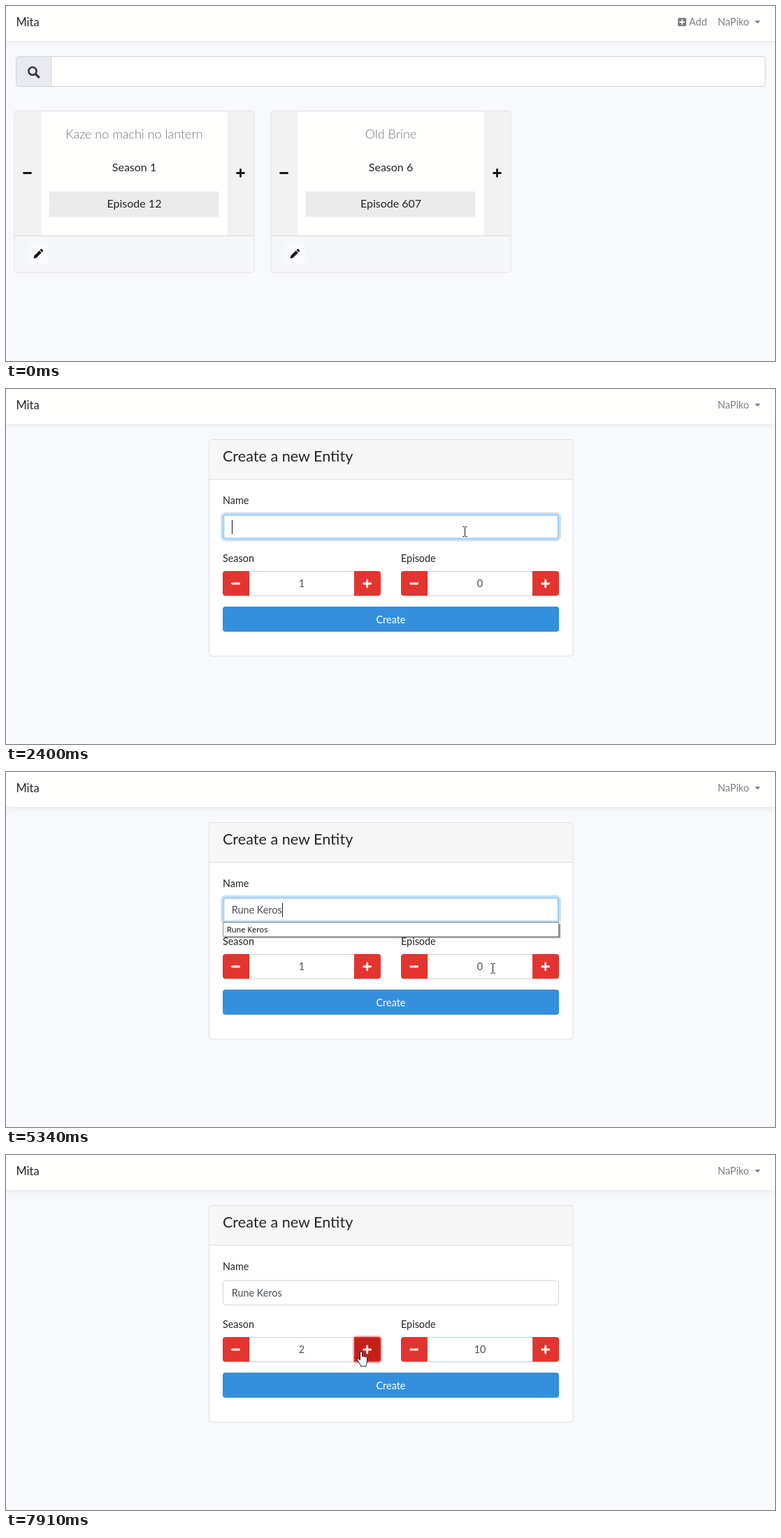
An HTML page that plays this animation: 1100 px wide and 509 px high, repeating every 7990 ms.

```html
<!DOCTYPE html>
<html lang="en">
<head>
<meta charset="utf-8">
<title>Mita</title>
<style>
  html, body { margin: 0; width: 100%; height: 100%; overflow: hidden; background: #f8f9fd; }
  svg { display: block; }
  text { font-family: Lato, "Open Sans", sans-serif; white-space: pre; }
  .nav { fill: #fffffe; filter: drop-shadow(0 2px 4px rgba(0, 0, 0, .075)); }
</style>
</head>
<body>
<svg id="stage" width="1100" height="509" viewBox="0 0 1100 509"></svg>
<script>
const LOOP = 7990;
const INK = '#212529', GREY = '#495057', LINE = '#ced4da', RED = '#e3342f';
const USER = 'NaPiko', SHOW = 'Rune Keros';

// Markup helpers
const text = (x, y, s, size = 14.4, fill = INK, more = '') =>
  `<text x="${x}" y="${y}" font-size="${size}" fill="${fill}" ${more}>${s}</text>`;
const mid = (x, y, s, size, fill, more = '') =>
  text(x, y, s, size, fill, 'text-anchor="middle" ' + more);
const rect = (x, y, w, h, fill, more = '') =>
  `<rect x="${x}" y="${y}" width="${w}" height="${h}" fill="${fill}" ${more}/>`;
const path = (d, more) => `<path d="${d}" ${more}/>`;
const sign = (x, y, plus, color) =>
  path(`M${x - 5} ${y}h10` + (plus ? `M${x} ${y - 5}v10` : ''),
    `stroke="${color}" stroke-width="2.8" stroke-linecap="round"`);
const group = (id, body) => `<g id="${id}">${body}</g>`;

function card(x, name, season, episode) {
  const c = x + 172;
  return rect(x + .5, 150.5, 343, 231.5, '#fffffe', 'rx="3.5"') +
    rect(x + 1, 151, 38, 179, '#f2f2f2') + rect(x + 305, 151, 38, 179, '#f2f2f2') +
    rect(x + 1, 330, 342, 51, '#f6f7f9') +
    path(`M${x} 329.5h343`, 'stroke="#d8d9dc"') +
    rect(x + .5, 150.5, 343, 231.5, 'none', 'rx="3.5" stroke="#dedfe1"') +
    sign(x + 19, 239.5, false, '#17141d') + sign(x + 324, 239.5, true, '#17141d') +
    mid(c, 190, name, 18, '#6c757d', 'font-weight="300"') +
    mid(c, 237, season, 16) +
    rect(x + 50, 266, 243, 36.5, '#ebebeb') +
    mid(c, 289, episode, 16) +
    rect(x + 20, 341, 30, 29, '#f8fafc', 'rx="3"') +
    path(`M${x + 28} 362l.8-3.9 7.4-7.4 3.1 3.1-7.4 7.4z
      M${x + 37} 349.9l1.2-1.2q.9-.8 1.8 0l1.3 1.3q.9.9 0 1.8l-1.2 1.2z`, 'fill="#1b1722"');
}

// Rounded on the left (-1) or right (1) side only
function button(id, x, side) {
  const d = side < 0
    ? `M${x + 38} 261h-34q-4 0-4 4v27.5q0 4 4 4h34z`
    : `M${x} 261h34q4 0 4 4v27.5q0 4-4 4h-34z`;
  return path(d, `id="${id}" fill="${RED}"`) + sign(x + 18.7, 279, side > 0, '#fff');
}
const stepper = (x, id) =>
  rect(x + 37.5, 261.5, 151, 35, '#fff', `stroke="${LINE}"`) +
  button(id + 'Minus', x, -1) + button(id + 'Plus', x + 188, 1);
const ring = (id, x, y, w, h, rgb, r = 0) =>
  rect(x, y, w, h, 'none', `id="${id}Ring" rx="${r}" stroke="${rgb}"`);
const caret = (id, y) => rect(0, y, 1, 20, '#111', `id="${id}Caret"`);

const stage = document.getElementById('stage');
stage.innerHTML =
  rect(0, 0, 1100, 50, '#fffffe', 'class="nav"') +
  text(14.5, 29, 'Mita', 16.4) +
  text(1018, 28, USER, 14.4, '#808080') +
  path('M1071 21h8l-4 4.2z', 'fill="#808080"') +

  group('home',
    group('add',
      rect(961, 17, 12, 12, 'currentColor', 'rx="1.6"') +
      path('M963.3 23h7.4M967 19.3v7.4', 'stroke="#fff" stroke-width="1.8"') +
      text(977, 28, 'Add', 14.4, 'currentColor')) +
    rect(14.5, 72.5, 1071.5, 43, '#fff', 'rx="4"') +
    path('M64.5 73v42H18.5q-3.5 0-3.5-3.5V76.5q0-3.5 3.5-3.5z', 'fill="#e9eaf0"') +
    path('M64.5 73v42', `stroke="${LINE}"`) +
    rect(14.5, 72.5, 1071.5, 43, 'none', `rx="4" stroke="${LINE}"`) +
    '<circle cx="38" cy="93.3" r="5.6" fill="none" stroke="#373540" stroke-width="2.6"/>' +
    path('M42.3 97.6l4.6 4.4', 'stroke="#373540" stroke-width="3.2" stroke-linecap="round"') +
    card(11.5, 'Kaze no machi no lantern', 'Season 1', 'Episode 12') +
    card(378.5, 'Old Brine', 'Season 6', 'Episode 607')) +

  group('form',
    rect(290.5, 72.5, 520.5, 310.5, '#fff', 'rx="4"') +
    rect(291, 73, 519.5, 57, '#f7f7f7', 'rx="3.5"') +
    path('M291 129.5h520', 'stroke="#dfdfdf"') +
    rect(290.5, 72.5, 520.5, 310.5, 'none', 'rx="4" stroke="#dedfe1"') +
    text(310, 104, 'Create a new Entity', 21.6) +
    text(310, 165, 'Name') +
    text(310, 247.5, 'Season') +
    text(565, 247.5, 'Episode') +
    rect(310.5, 180, 480, 35, '#fff', `id="nameBox" rx="4" stroke="${LINE}"`) +
    ring('name', 310, 179.5, 481, 36, '#3490dc', 4) +
    text(322.7, 203, '', 14.4, GREY, 'id="name"') + caret('name', 188) +
    stepper(310, 's') + stepper(565, 'e') +
    rect(602.5, 261.5, 151, 35, 'none', 'id="epBox" stroke="#a1cbef"') +
    ring('ep', 602, 261, 152, 36, '#3490dc') +
    ring('plus', 498, 261, 38, 35.5, RED, 3) +
    mid(423, 284, '1', 14.4, GREY, 'id="season"') +
    mid(678, 284, '0', 14.4, GREY, 'id="ep"') + caret('ep', 269) +
    rect(310, 312, 481, 36, '#3490dc', 'rx="4"') +
    mid(550.5, 335.5, 'Create', 14.4, '#fff') +
    group('list',
      rect(313, 218, 480.5, 20.5, '#000', 'opacity=".18"') +
      rect(313, 218, 479.5, 19.5, '#000', 'opacity=".35"') +
      rect(310.5, 215.5, 480, 20.5, '#fff', 'stroke="#8c8c8c"') +
      `<text x="316" y="230" font-size="11" style="font-family:'Open Sans','Noto Sans',sans-serif">${SHOW}</text>`)) +

  group('cursor',
    path('M.5 .5V16.5L4.2 13.2L6.8 19L9 18L6.5 12.2H11.5Z', 'id="arrow" fill="#fff" stroke="#15151f"') +
    path('M4.5 13V2.3a1.5 1.5 0 0 1 3 0V8c.2-1.2 2.5-1 2.6.4c.2-1 2.2-.9 2.4.5c.2-.9 2-.7 2 .9V15c0 3-1.5 4-1.5 7H5.5C5 18 1.5 16 .6 12.5c-.3-1.4 1.2-2 2.2-1z',
      'id="hand" fill="#fff" stroke="#15151f"') +
    path('M.5 .5h2l1 1 1-1h2M3.5 1.5v12M.5 14.5h2l1-1 1 1h2', 'id="beam" fill="none" stroke="#111"'));

const el = {};
stage.querySelectorAll('[id]').forEach(n => el[n.id] = n);

// Step tables: [time, value...], each row holds until the next
const MOVES = [
  [0, -50, -50, 'arrow'],
  [300, 1015, 454, 'arrow'], [380, 1011, 318, 'arrow'], [460, 996, 234, 'arrow'],
  [530, 976, 165, 'arrow'], [610, 967, 92, 'arrow'], [680, 964, 40, 'arrow'],
  [760, 962, 10, 'hand'], [930, 966, 4, 'hand'], [1000, 970, 1, 'hand'], [1080, 968, 9, 'hand'],
  [1400, 974, 9, 'arrow'], [1710, 948, 26, 'arrow'], [1790, 868, 78, 'arrow'],
  [1870, 762, 140, 'arrow'], [1940, 684, 190, 'beam'], [2020, 653, 197, 'beam'],
  [2480, 646, 199, 'beam'], [2630, 639, 199, 'beam'],
  [4880, 641, 204, 'beam'], [4950, 648, 215, 'arrow'], [5030, 660, 232, 'arrow'],
  [5110, 674, 250, 'arrow'], [5190, 686, 265, 'beam'], [5260, 691, 272, 'beam'],
  [5340, 693, 274, 'beam'], [5490, 697, 276, 'beam'], [5570, 699, 277, 'beam'],
  [5650, 693, 274, 'beam'], [6680, 694, 275, 'beam'],
  [6980, 684, 276, 'beam'], [7060, 656, 277, 'beam'], [7130, 618, 279, 'beam'],
  [7210, 574, 281, 'hand'], [7290, 540, 282, 'arrow'], [7360, 508, 281, 'hand'],
  [7440, 496, 281, 'hand'], [7670, 502, 281, 'hand']
];
const TYPED = [0, 2950, 3190, 3270, 3420, 3500, 3730, 3880, 4110, 4260, 4340];
const NAME_FOCUS = [[0, 0], [2250, .35], [2330, .9], [2400, 1], [5420, .5], [5490, 0]];
const EP_FOCUS = [[0, 0], [5420, .35], [5490, .9], [5570, 1], [7840, .7], [7910, .2]];
const PLUS_FOCUS = [[0, 0], [7840, .3], [7910, .7]];
const NAME_CARET = [[0, 0], [2250, 1], [2780, 0], [2950, 1], [4420, 0], [4950, 1], [5420, 0]];
const EP_CARET = [[0, 0], [5650, 1], [6830, 0], [7360, 1], [7840, 0]];
const EPISODE = [[0, '0'], [6130, '1'], [6280, '10']];

const at = (rows, t) => rows.filter(r => r[0] <= t).pop();
const show = (node, on) => node.setAttribute('visibility', on ? 'visible' : 'hidden');
const set = (node, attrs) => { for (const k in attrs) node.setAttribute(k, attrs[k]); };

// A focus ring grows outward from the box edge
const glow = (node, p, alpha) =>
  set(node, { 'stroke-width': 6 * p, 'stroke-opacity': alpha * p });

function draw(t) {
  const formOpen = t >= 1400;
  el.home.style.display = formOpen ? 'none' : '';
  el.form.style.display = formOpen ? '' : 'none';

  const [, x, y, kind] = at(MOVES, t);
  set(el.cursor, { transform: `translate(${x} ${y})` });
  for (const k of ['arrow', 'hand', 'beam']) show(el[k], k === kind);
  el.add.style.color = kind === 'hand' ? '#4d4d4d' : '#808080';
  if (!formOpen) return;

  const over = left => kind === 'hand' && x + 6 >= left && x + 6 < left + 38;
  set(el.eMinus, { fill: over(565) ? '#d0211c' : RED });
  set(el.sPlus, { fill: t >= 7840 ? '#c51f1a' : over(498) ? '#d0211c' : RED });

  const nameOn = at(NAME_FOCUS, t)[1], epOn = at(EP_FOCUS, t)[1];
  set(el.nameBox, { stroke: nameOn > .4 ? '#a1cbef' : LINE });
  set(el.epBox, { 'stroke-opacity': epOn });
  glow(el.nameRing, nameOn, .25);
  glow(el.epRing, epOn, .25);
  glow(el.plusRing, at(PLUS_FOCUS, t)[1], .5);

  el.name.textContent = SHOW.slice(0, TYPED.filter(k => k <= t).length - 1);
  el.ep.textContent = at(EPISODE, t)[1];
  el.season.textContent = t >= 7840 ? '2' : '1';
  show(el.list, t >= 3020 && t < 5420);

  const end = el.name.textContent ? el.name.getComputedTextLength() : 0;
  set(el.nameCaret, { x: Math.round(322.7 + end) });
  set(el.epCaret, { x: Math.round(678 + el.ep.getComputedTextLength() / 2) });
  el.nameCaret.style.display = at(NAME_CARET, t)[1] ? '' : 'none';
  el.epCaret.style.display = at(EP_CARET, t)[1] ? '' : 'none';
}

const start = performance.now();
function tick() {
  draw((performance.now() - start) % LOOP);
  requestAnimationFrame(tick);
}
tick();
</script>
</body>
</html>
```
